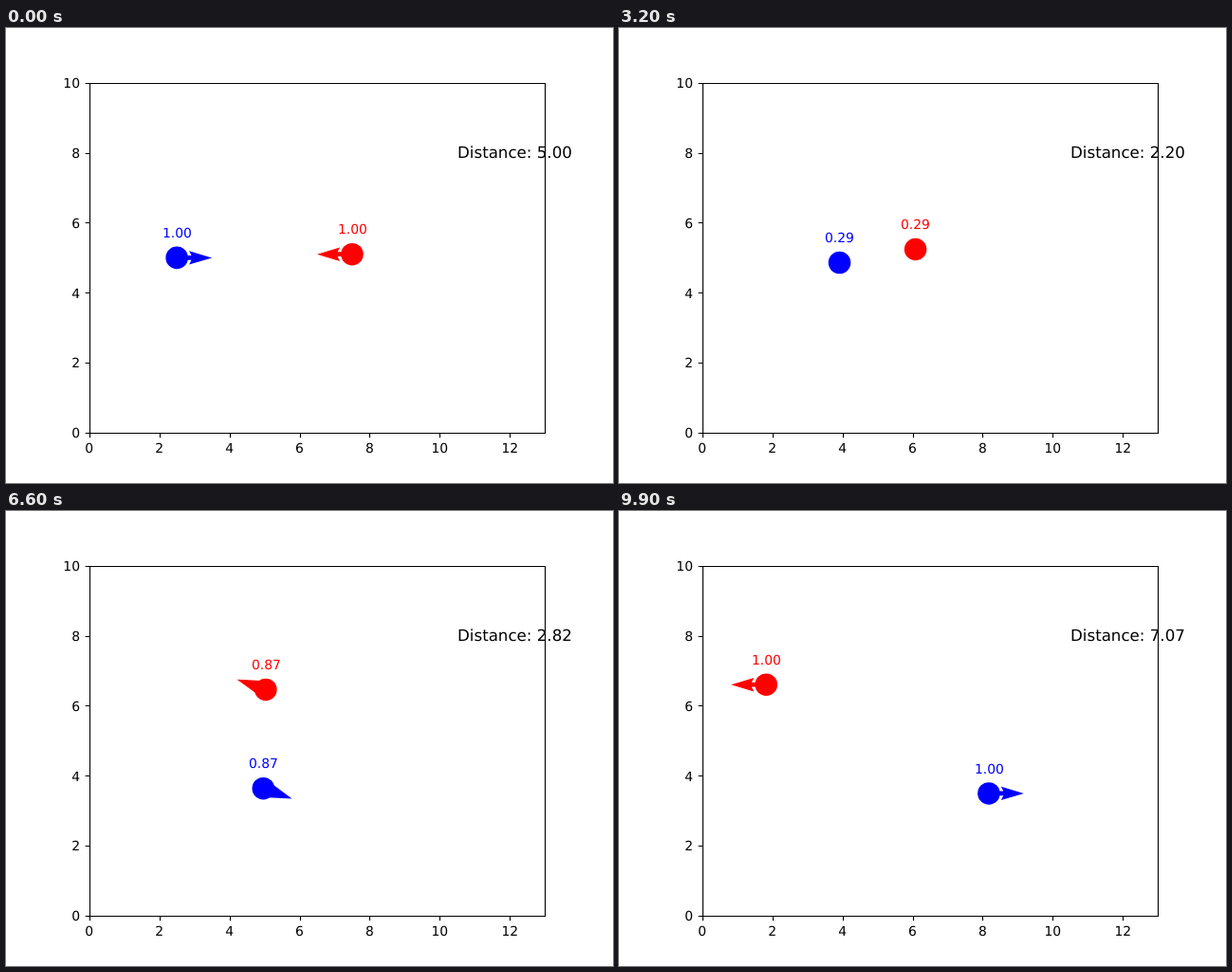
Recreate the animation shown at these times as an HTML page. Size 640 by 480 pixels, loop 10 s.

```html
<!DOCTYPE html>
<html lang="en">
<head>
<meta charset="utf-8">
<title>Two agents avoiding each other</title>
<style>
  html, body { margin: 0; width: 100%; height: 100%; overflow: hidden; background: #fff; }
  svg { display: block; width: 640px; height: 480px; }
  text { font: 13.889px "DejaVu Sans", sans-serif; text-rendering: geometricPrecision; }
  #distance { font-size: 16.667px; }
  .axis { fill: none; stroke: #000; stroke-width: 1.11; }
</style>
</head>
<body>
<svg id="stage" viewBox="0 0 640 480"></svg>
<script>
const STEP = 100, STEPS = 100;
const UNIT = 36.96, LEFT = 87.76, BOTTOM = 427.2;
const RADIUS = 11.78, SHAFT = 4.8;

// Blue agent: step, x, y, vx, vy (units and units per second)
const KNOTS = [
  [0, 2.5, 5, 1, 0],
  [12, 3.7, 5, 1, 0],
  [17, 4.02, 4.985, 0, -0.05],
  [25, 3.835, 4.935, 0, -0.08],
  [32, 3.917, 4.86, 0.25, -0.15],
  [44, 4.1, 4.61, 0.08, -0.31],
  [57, 4.376, 4.125, 0.487, -0.445],
  [66, 4.965, 3.64, 0.82, -0.29],
  [74, 5.69, 3.536, 0.965, -0.08],
  [89, 7.175, 3.498, 1, 0],
  [99, 8.175, 3.498, 1, 0]
];

const stage = document.getElementById("stage");
const px = x => LEFT + x * UNIT;
const py = y => BOTTOM - y * UNIT;
const snap = v => Math.round(v) + 0.5;

function add(tag, attrs, text = "") {
  const el = document.createElementNS("http://www.w3.org/2000/svg", tag);
  set(el, attrs);
  el.textContent = text;
  stage.appendChild(el);
  return el;
}

function set(el, attrs) {
  for (const key in attrs) el.setAttribute(key, attrs[key]);
}

function drawAxes() {
  const x0 = snap(px(0)), x1 = snap(px(13)), y0 = snap(py(0)), y1 = snap(py(10));
  let path = `M${x0} ${y0}H${x1}V${y1}H${x0}Z`;
  for (let v = 0; v <= 12; v += 2) {
    path += `M${snap(px(v))} ${y0}v4.86`;
    add("text", { x: px(v), y: 448, "text-anchor": "middle" }, v);
  }
  for (let v = 0; v <= 10; v += 2) {
    path += `M${x0} ${snap(py(v))}h-4.86`;
    add("text", { x: 78, y: Math.round(py(v) + 5.2), "text-anchor": "end" }, v);
  }
  add("path", { class: "axis", d: path });
}

function makeAgent(color) {
  return {
    arrow: add("path", { fill: color }),
    disc: add("circle", { fill: color, r: RADIUS }),
    label: add("text", { fill: color })
  };
}

// Cubic Hermite value and slope over a span of T seconds
function hermite(s, T, a, b, va, vb) {
  const d = b - a, ma = va * T, mb = vb * T;
  return [
    a + ma * s + (3 * d - 2 * ma - mb) * s * s + (ma + mb - 2 * d) * s ** 3,
    (ma + 2 * (3 * d - 2 * ma - mb) * s + 3 * (ma + mb - 2 * d) * s * s) / T
  ];
}

function blueState(step) {
  let i = 0;
  while (i < KNOTS.length - 2 && step >= KNOTS[i + 1][0]) i++;
  const a = KNOTS[i], b = KNOTS[i + 1];
  const s = (step - a[0]) / (b[0] - a[0]), T = (b[0] - a[0]) / 10;
  const [x, vx] = hermite(s, T, a[1], b[1], a[3], b[3]);
  const [y, vy] = hermite(s, T, a[2], b[2], a[4], b[4]);
  return { x, y, vx, vy };
}

// Arrow along +x; short arrows shrink as a whole
function arrowPath(length) {
  const w = SHAFT * Math.min(1, length / (5 * SHAFT));
  const h = w / 2, neck = length - 4.5 * w, barb = length - 5 * w;
  return `M0 ${-h}H${neck}L${barb} ${-3 * h}L${length} 0L${barb} ${3 * h}L${neck} ${h}H0Z`;
}

function place(agent, { x, y, vx, vy }) {
  const cx = px(x), cy = py(y), speed = Math.hypot(vx, vy);
  const angle = Math.atan2(-vy, vx) * 180 / Math.PI;
  set(agent.disc, { cx, cy });
  set(agent.arrow, {
    d: arrowPath(speed * UNIT),
    transform: `translate(${cx} ${cy}) rotate(${angle})`
  });
  set(agent.label, { x: Math.round(cx - 15.2), y: Math.round(cy - 21.4) });
  agent.label.textContent = speed.toFixed(2);
}

drawAxes();
const blue = makeAgent("#00f");
const red = makeAgent("#f00");
const distance = add("text", { id: "distance", x: 476, y: 137 });

function render(step) {
  const p = blueState(step);
  const q = { x: 10 - p.x, y: 10.1 - p.y, vx: -p.vx, vy: -p.vy };
  place(blue, p);
  place(red, q);
  distance.textContent = "Distance: " + Math.hypot(q.x - p.x, q.y - p.y).toFixed(2);
}

function tick() {
  render(Math.floor(performance.now() / STEP) % STEPS);
  requestAnimationFrame(tick);
}

render(0);
requestAnimationFrame(tick);
</script>
</body>
</html>
```
